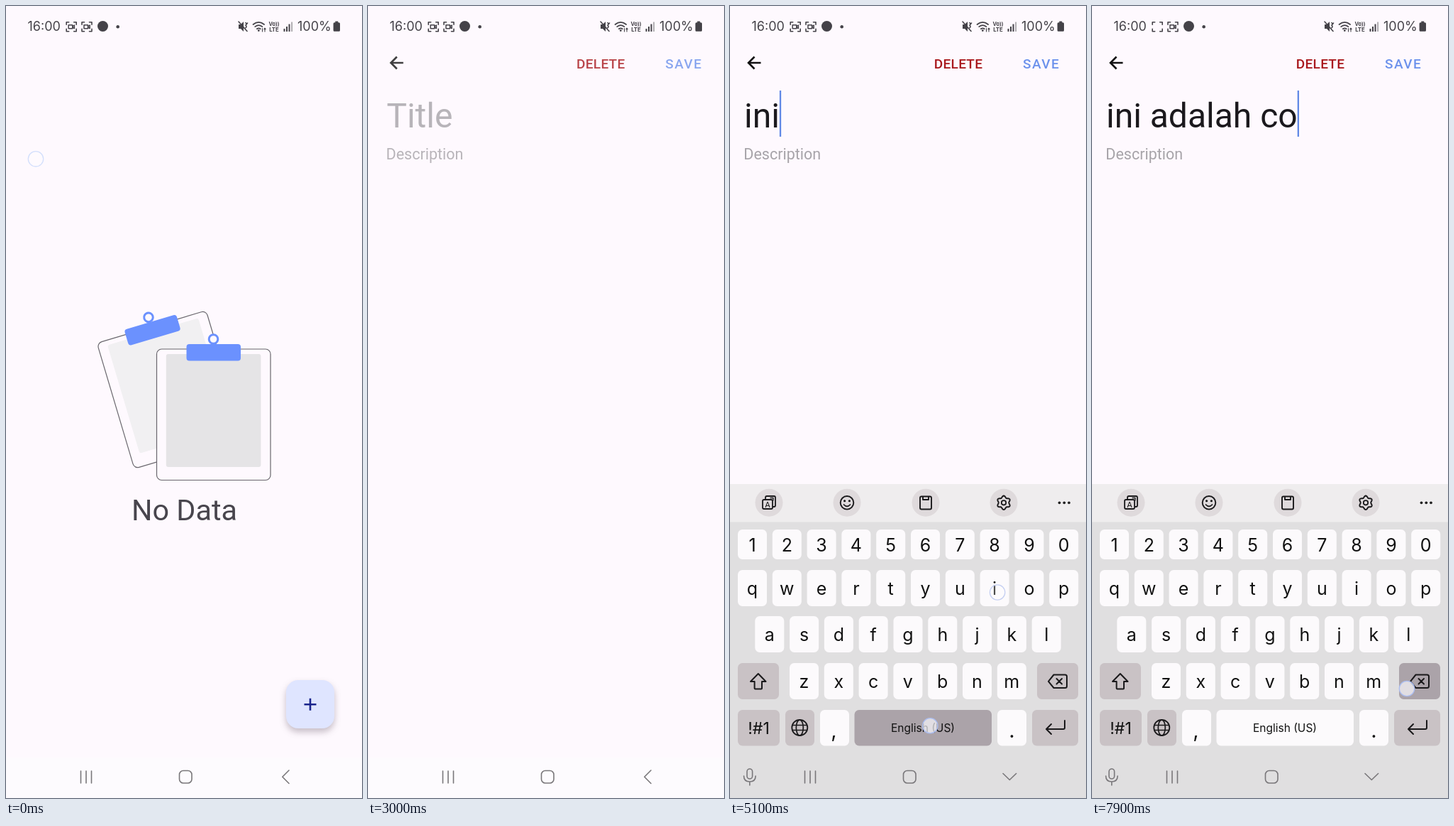
Animation, 502 px wide and 1115 px high, one loop 8000 ms. Source, as an HTML page:

```html
<!DOCTYPE html>
<html lang="en">
<head>
<meta charset="utf-8">
<title>Notes</title>
<style>
  html, body { margin: 0; width: 100%; height: 100%; overflow: hidden; background: #fef9fe; }
  svg { display: block; width: 100%; height: 100%; }
  text { font-family: Roboto, sans-serif; white-space: pre; }
  .ui { font-family: Inter, sans-serif; }
  .mid { text-anchor: middle; }
  .line { fill: none; stroke-linecap: round; stroke-linejoin: round; }
  #fabBox { filter: drop-shadow(0 5px 5px rgba(70, 50, 70, .3)); }
  #pop rect { filter: drop-shadow(0 2px 4px rgba(50, 40, 50, .3)); }
</style>
</head>
<body>
<svg id="stage" viewBox="0 0 502 1115">
  <defs>
    <g id="board">
      <rect width="160.5" height="184.5" rx="7" fill="#fef9fe" stroke="#69676d" stroke-width="1.2"/>
      <rect x="13.3" y="7" width="133.6" height="159" rx="3"/>
      <circle cx="80" cy="-14" r="6.3" fill="#fef9fe" stroke="#6b91fe" stroke-width="3"/>
      <rect x="42" y="-7" width="76.5" height="23.5" rx="4" fill="#6b91fe"/>
    </g>
    <path id="corners" class="line" stroke-width="1.6"
      d="M-7-3V-6.5H-3.5M3.5-6.5H7V-3M7 3V6.5H3.5M-3.5 6.5H-7V3"/>
    <path id="cam" class="line" stroke-width="1.5" d="M-4-2.5H1.5V2.5H-4ZM1.5-.3L4.2-2.3V2.3L1.5 .3"/>
  </defs>
  <rect width="502" height="1115" fill="#fef9fe"/>

  <g id="home">
    <use href="#board" fill="#f1f0f2" transform="translate(128.3 474.6) rotate(-16.6)"/>
    <use href="#board" fill="#e5e4e6" transform="translate(212.5 483)"/>
    <text class="mid" x="251.5" y="724" font-size="41.3" fill="#48454d">No Data</text>
    <rect id="fabBox" x="395" y="949" width="68" height="68" rx="17" fill="#dfe5ff"/>
    <path d="M420.5 983.3H437.5M429 974.8V991.8" fill="none" stroke="#1a248c" stroke-width="2.6"/>
  </g>

  <g id="note">
    <path d="M43.5 80H26M34.5 71.5L26 80L34.5 88.5" fill="none" stroke="#111" stroke-width="2.6"/>
    <text x="287.8" y="87.5" font-size="19" font-weight="500" letter-spacing=".3" fill="#a9191d">DELETE</text>
    <text x="413" y="87.5" font-size="19" font-weight="500" letter-spacing="1.4" fill="#6c92ec">SAVE</text>
    <text id="title" x="20" y="171" font-size="48"></text>
    <rect id="caret" y="119" width="2.3" height="65" fill="#6189e6"/>
    <text x="19.3" y="216" font-size="21.5" fill="#a7a4a9">Description</text>
  </g>

  <g fill="#444248" stroke="none">
    <text class="ui" x="30.5" y="35" font-size="18">16:00</text>
    <g stroke="#444248">
      <use href="#corners" x="92.2" y="29.3"/><use id="blink" href="#cam" x="92.2" y="29.3"/>
      <use href="#corners" x="114" y="29.3"/><use href="#cam" x="114" y="29.3"/>
    </g>
    <circle cx="136.5" cy="28.5" r="7.5"/>
    <circle cx="157.7" cy="29.2" r="2.3"/>
    <path d="M328 26H331L335 22V36L331 32H328Z"/>
    <path class="line" stroke="#444248" stroke-width="1.6"
      d="M328 22L340 35.5M338 23.5q2 1.8 0 3.6q2 1.8 0 3.6M340.5 24l-1 1.4"/>
    <path class="line" stroke="#444248" stroke-width="1.7"
      d="M348.5 26q7.8-6.4 15.6 0M351.2 29.2q5.1-4 10.2 0M353.8 32.2q2.5-1.8 5 0"/>
    <circle cx="356.3" cy="34.6" r="1.4"/>
    <path class="line" stroke="#444248" stroke-width="1.1" d="M361.5 31.5V36M365 36V31.5M363.9 32.6L365 31.2L366.1 32.6"/>
    <text class="ui mid" x="378" y="27.6" font-size="7.4" font-weight="700">Vo))</text>
    <text class="ui mid" x="378" y="36" font-size="7.8" font-weight="700">LTE</text>
    <path d="M391.5 32h2v4h-2zM395 29h2v7h-2zM398.5 25.5h2v10.5h-2z"/>
    <path d="M402.2 22.5h1.8v13.5h-1.8z" opacity=".45"/>
    <text class="ui" x="411" y="35" font-size="18">100%</text>
    <path d="M464.3 21.5h4v1.7h1.2q1.5 0 1.5 1.5v9.6q0 1.5-1.5 1.5h-6.4q-1.5 0-1.5-1.5v-9.6q0-1.5 1.5-1.5h1.2z"/>
  </g>

  <rect y="1058" width="502" height="57" fill="#fdfbfe"/>
  <g id="board2"></g>
  <g class="line" stroke="#79777a" stroke-width="1.6">
    <path d="M105.5 1077V1094M113 1077V1094M120.5 1077V1094"/>
    <rect x="244.5" y="1076.5" width="17.5" height="17.5" rx="5.5"/>
    <path id="back" d="M399 1076L389.8 1085.2L399 1094.5"/>
    <g id="down">
      <path d="M385 1080.5L394.3 1089.5L403.6 1080.5"/>
      <rect x="24" y="1074" width="7.6" height="14" rx="3.8"/>
      <path d="M19.5 1084q0 8 8.3 8t8.3-8M27.8 1092V1097"/>
    </g>
  </g>
  <g id="pop">
    <rect width="75" height="97" rx="9" fill="#fcfafc"/>
    <text class="ui mid" x="37.5" y="65" font-size="37" fill="#111"></text>
  </g>
  <circle id="ringA" r="10.7" stroke-width="1.3"/>
  <circle id="ringB" r="10.7" stroke-width="1.3"/>
</svg>
<script>
const $ = id => document.getElementById(id);
const LOOP = 8000, PLAIN = '#fcfafc', GREY = '#c9c2c5', DOWN = '#aba3a9';
const keys = {};

// keyboard, in its raised position
function key(name, x, y, w, h, fill = PLAIN, inner = '') {
  keys[name] = { x, y, w, h, fill };
  return `<g data-key="${name}"><rect x="${x}" y="${y}" width="${w}" height="${h}" rx="6.5" fill="${fill}"/>${inner}</g>`;
}
function label(s, x, y, size) {
  return `<text class="ui mid" x="${x}" y="${y}" font-size="${size}" fill="#111">${s}</text>`;
}
function row(chars, x, y, h, base) {
  return [...chars].map((c, i) => {
    const kx = x + i * 48.8;
    return key(c, kx, y, 41, h, PLAIN, label(c, kx + 20.5, base, 25));
  }).join('');
}
function icon(d, width = 2) {
  return `<path class="line" stroke="#1a191b" stroke-width="${width}" d="${d}"/>`;
}
function gear(cx, cy) {
  let d = '';
  for (let i = 0; i <= 48; i++) {
    const a = i / 48 * 2 * Math.PI, r = 8.5 + 1.3 * Math.cos(6 * a);
    d += `${i ? 'L' : 'M'}${(cx + r * Math.sin(a)).toFixed(1)} ${(cy + r * Math.cos(a)).toFixed(1)}`;
  }
  return icon(d + 'Z', 1.9) + `<circle cx="${cx}" cy="${cy}" r="3.2" fill="none" stroke="#1a191b" stroke-width="1.8"/>`;
}

$('board2').innerHTML =
  '<rect y="673" width="502" height="500" fill="#e0dfe0"/><rect y="673" width="502" height="53.5" fill="#efedee"/>' +
  [55, 165, 276, 386].map(x => `<circle cx="${x}" cy="699.3" r="19.5" fill="#dfdadc"/>`).join('') +
  icon('M50 694V692q0-2 2-2H62q2 0 2 2V703q0 2-2 2H61M48 695H58q2 0 2 2V706q0 2-2 2H48q-2 0-2-2V697q0-2 2-2ZM55 691.5', 1.8) +
  label('A', 53, 705.6, 11) + icon('M57 692.5H61V696', 1.3) +
  '<circle cx="165" cy="699.3" r="9.3" fill="none" stroke="#1a191b" stroke-width="1.9"/>' +
  '<circle cx="161.6" cy="696.8" r="1.5"/><circle cx="168.4" cy="696.8" r="1.5"/>' + icon('M160.5 702q4.5 4.8 9 0', 1.7) +
  icon('M270 690.5H282q2 0 2 2V706.5q0 2-2 2H270q-2 0-2-2V692.5q0-2 2-2ZM272 690.5V695H280V690.5', 1.9) +
  gear(386, 699.3) +
  [464.5, 471.3, 478].map(x => `<circle cx="${x}" cy="699.3" r="1.9" fill="#222"/>`).join('') +
  row('1234567890', 11, 737, 42, 767.5) +
  row('qwertyuiop', 11, 794, 51, 828.5) +
  row('asdfghjkl', 35.3, 859, 51, 894) +
  row('zxcvbnm', 84, 925, 51, 960) +
  key('shift', 11, 925, 58, 51, GREY, icon('M39.8 940L50.5 951H45V960.5q0 1-1 1H35.6q-1 0-1-1V951H29Z')) +
  key('del', 433, 925, 58, 51, GREY,
    icon('M456.5 941.5H472.5q2.5 0 2.5 2.5V957.500q0 2.500-2.500 2.500H456.500L449 950.800ZM460.500 947L468 954.500M468 947L460.500 954.500')) +
  key('sym', 11, 991, 59, 50.5, GREY, label('!#1', 40.5, 1024.5, 23)) +
  key('lang', 78, 991, 41, 50.5, GREY,
    '<circle cx="98.300" cy="1016" r="11" fill="none" stroke="#1a191b" stroke-width="1.800"/>'.replace(/00"/g, '"') +
    '<ellipse cx="98.3" cy="1016" rx="5" ry="11" fill="none" stroke="#1a191b" stroke-width="1.7"/>' +
    icon('M88 1012.500H108.500M88 1019.500H108.500', 1.6)) +
  key(',', 127, 991, 41, 50.5, PLAIN, label(',', 146.5, 1030, 29)) +
  key(' ', 175.5, 991, 193.500, 50.5, PLAIN, label('English (US)', 272, 1022, 15.5)) +
  key('.', 377, 991, 41, 50.5, PLAIN, label('.', 397.5, 1030, 29)) +
  key('enter', 426, 991, 65, 50.5, GREY, icon('M472 1006V1016q0 2-2 2H446.5M453 1011L446 1018L453 1025'));

document.querySelectorAll('[data-key]').forEach(g => {
  const k = keys[g.dataset.key];
  k.rect = g.querySelector('rect');
  k.text = g.querySelector('text');
});

// one character per 100 ms from step 47; '-' is a pause
const TYPED = 'in-i -ad-ala-h- contoh- ', FIRST = 47;
const OFFSET = { a: [5, 6], l: [10, 13], h: [8, 2], o: [-1, 11], ' ': [10, -3], del: [-18, 10.5] };
const CUTS = [[79, 5], [78, 4], [76, 2], [74, 1], [0, 0]];

const clamp = v => Math.min(1, Math.max(0, v));
const easeOut = p => 1 - (1 - clamp(p)) ** 3;
const show = (el, on) => el.setAttribute('visibility', on ? 'visible' : 'hidden');

function keyAt(step) {
  if (step >= 73) return 'del';
  const c = TYPED[step - FIRST];
  return c && c !== '-' ? c : null;
}
function spot(name) {
  if (!name) return null;
  const k = keys[name], [dx, dy] = OFFSET[name] || [4, 6];
  return [k.x + k.w / 2 + dx, k.y + k.h / 2 + dy];
}
function touchAt(step) {
  if (step === 26) return [429, 985];
  if (step === 40) return [120, 160];
  return spot(keyAt(step));
}
function ring(el, pos, fill, stroke) {
  show(el, pos);
  if (!pos) return;
  el.setAttribute('cx', pos[0]);
  el.setAttribute('cy', pos[1]);
  el.setAttribute('fill', fill);
  el.setAttribute('stroke', stroke);
}

let held = null;
function press(name) {
  if (held) {
    held.rect.setAttribute('fill', held.fill);
    if (held.text) held.text.setAttribute('fill', '#111');
  }
  held = name ? keys[name] : null;
  const letter = name && name.length === 1 && name !== ' ';
  show($('pop'), letter);
  if (!held) return;
  held.rect.setAttribute('fill', DOWN);
  if (!letter) return;
  held.text.setAttribute('fill', '#d3cbd0');
  $('pop').setAttribute('transform', `translate(${held.x + held.w / 2 - 37.5} ${held.y - 106})`);
  $('pop').querySelector('text').textContent = name;
}

function draw(step) {
  const t = step * 100;
  show($('blink'), Math.floor(t / 500) % 2 === 0);

  // page change
  const p = easeOut((t - 2700) / 600);
  $('home').setAttribute('transform', `translate(${-50 * p} 0)`);
  $('home').setAttribute('opacity', clamp(1 - p * 1.6));
  $('note').setAttribute('transform', `translate(${50 * (1 - p)} 0)`);
  $('note').setAttribute('opacity', clamp(p * 1.6 - .6));
  $('fabBox').setAttribute('fill', step === 26 || step === 27 ? '#cdd5f8' : '#dfe5ff');

  // keyboard rise
  const up = easeOut((t - 4100) / 435);
  show($('board2'), up > 0);
  $('board2').setAttribute('transform', `translate(0 ${442 * (1 - up)})`);
  show($('back'), up === 0);
  show($('down'), up > 0);

  // title field
  const cut = CUTS.find(c => step >= c[0])[1];
  const full = TYPED.slice(0, Math.max(0, step - FIRST)).replace(/-/g, '');
  const text = full.slice(0, full.length - cut);
  const title = $('title');
  title.textContent = text || 'Title';
  title.setAttribute('fill', text ? '#1b191d' : '#a6a3a8');
  $('caret').setAttribute('x', 20 + (text ? title.getComputedTextLength() : 0));
  show($('caret'), t >= 4100);

  // touches
  press(keyAt(step));
  const now = touchAt(step), before = step < 74 ? touchAt(step - 1) : null;
  ring($('ringA'), now, 'rgba(250,250,255,.68)', '#abbdf0');
  ring($('ringB'), step === 0 ? [42, 215.3] : before, 'rgba(255,255,255,.25)', step ? '#c6d0f2' : '#d3dffc');
}

let last = -1;
function tick() {
  const step = Math.floor(performance.now() % LOOP / 100);
  if (step !== last) draw(last = step);
  requestAnimationFrame(tick);
}
tick();
</script>
</body>
</html>
```
